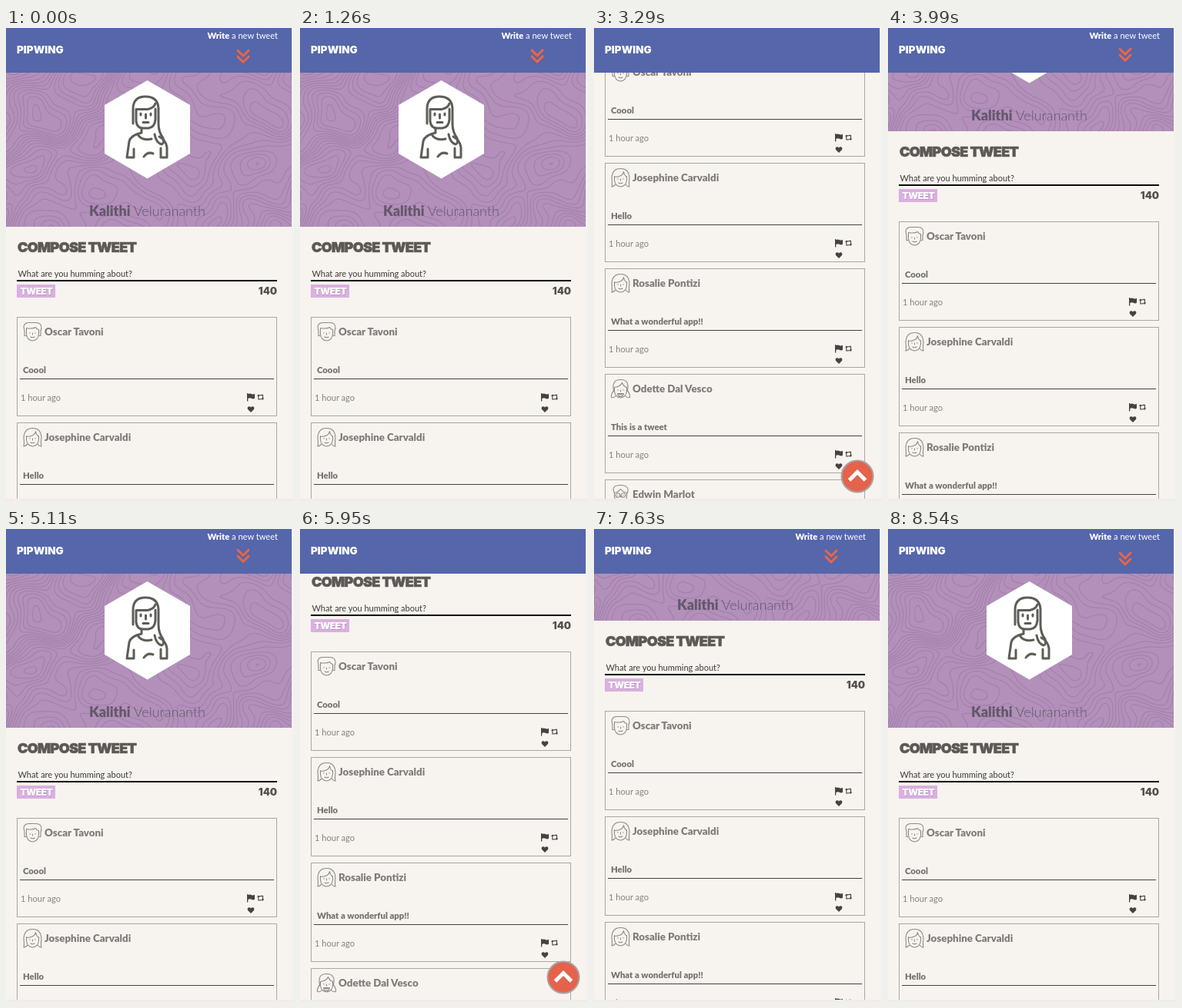
An HTML page with a canvas for the animation above (8610 ms loop, 374 px wide and 614 px high).

```html
<!DOCTYPE html>
<html lang="en">
<head>
<meta charset="utf-8">
<title>Pipwing</title>
<style>
  html, body { margin: 0; width: 100%; height: 100%; overflow: hidden; background: #f7f3ef; }
  #stage { position: relative; width: 374px; height: 614px; overflow: hidden; }
  #page { position: absolute; top: 0; left: 0; will-change: transform; }
  #topo { position: absolute; top: 58px; left: 0; }
  svg { position: absolute; top: 0; left: 0; display: block; }
  text { font-family: Lato, "Open Sans", sans-serif; font-size: 11.1px; }
  .block { font-family: Inter, Roboto, sans-serif; font-weight: 900; }
  .bold { font-weight: 900; }
  .light { font-weight: 300; }
  .line { fill: none; stroke-linecap: round; stroke-linejoin: round; }
  .name { font-size: 13.3px; font-weight: 900; fill: #7f7c7a; }
  .body { font-size: 11.3px; font-weight: 900; fill: #75726f; }
  .time { font-weight: 400; fill: #85817e; }
</style>
</head>
<body>
<div id="stage">
  <div id="page">
    <canvas id="topo" width="371" height="200"></canvas>
    <svg width="374" height="1100">
      <defs>
        <g id="icons" fill="#454240">
          <path d="M313 474h1.300v10.500H313zM314.300 475q2.200-1.200 4.400 0t4.300-.2v6q-2.100 1.200-4.300 0t-4.400.2z"/>
          <path class="line" stroke="#454240" stroke-width="1.100" d="M329.500 482h-1.700v-5.200h4.200M331.500 476.300h2v5.400h-4"/>
          <path d="M326 477.800l1.800-2.300 1.800 2.300zM331.700 480.500l1.800 2.300 1.800-2.300z"/>
          <path d="M318 499l-4-4q-1.200-2.200.6-3.500 2-1 3.400.9 1.400-1.900 3.400-.9 1.800 1.300.6 3.500z"/>
        </g>
        <g id="face">
          <path d="M-8-2V3Q-7 11 0 11.500Q7 11 8 3V-2"/>
          <path d="M-3.500 1v.6M3.500 1v.6M0 1.500v2M-2.500 6.500q2.500 1.500 5 0"/>
        </g>
        <g id="man">
          <use href="#face"/>
          <path d="M-8.500 5h-2v-6l-1-6q1-5 7-5h9q7 0 7 7l-1 4v6h-2M-8-2V-5q8 1.500 12-1 1 2.500 4 3v2"/>
        </g>
        <g id="girl">
          <use href="#face"/>
          <path d="M-8-1Q3-1 4-8Q5-3 8-1M-7 9q-3 3-4.500 2.500 1-4 0-11Q-11-12 0-12Q11-12 11.500 .500q-1 7 0 11-2 .5-4.500-2.500"/>
        </g>
        <g id="pigtails">
          <use href="#face"/>
          <path d="M-8-2Q0-3 2-8Q4-3 8-2M-9 2Q-12-12 0-12Q12-12 9 2M-8.500 2q-4 4-3.500 9 4 1 6-2M8.500 2q4 4 3.500 9-4 1-6-2M-4 6h8q-1 4-4 4t-4-4z"/>
        </g>
        <g id="glasses">
          <use href="#face"/>
          <path d="M-8-2Q-13-12 0-12Q12-12 9-2Q3-3 0-7Q-3-3-8-2"/>
          <circle cx="-3.500" cy="1" r="2.800"/><circle cx="3.500" cy="1" r="2.800"/>
        </g>
      </defs>

      <path fill="#fff" d="M183.500 68L239 100V163L183.500 195.500L128 163V100z"/>
      <g class="line" stroke="#5c5e57" stroke-width="3">
        <path d="M165 124V105Q165 89 181 89Q197 89 198 104V124Q198 135 204 143Q206 150 202 151Q195 149 193 138"/>
        <path d="M169 105.500H184Q192 104 194 98M169 105.500V121Q170 130 178 130H185Q193 129 194 119V105"/>
        <path d="M175 111v2M188 111v2M181.500 112v5M178 122.500h7"/>
        <path d="M176 131v5Q162 139 160 147L157 168H166V157M199 141Q208 146 209 155V168H201V156"/>
        <path d="M171 138Q176 147 189 144M179 167Q184 160 191 163"/>
      </g>
      <text x="183.500" y="244" text-anchor="middle" fill="#63586a" style="font-size:18px"><tspan class="bold">Kalithi</tspan><tspan class="light"> Velurananth</tspan></text>

      <text class="block" x="15" y="290.500" fill="#5d5855" stroke="#5d5855" stroke-width=".6" style="font-size:18px;letter-spacing:-.7px">COMPOSE TWEET</text>
      <text x="15.500" y="323" fill="#3c3a38" style="font-size:11px">What are you humming about?</text>
      <rect x="14" y="327" width="338" height="2" fill="#0b0a0a"/>
      <rect x="14" y="333" width="50" height="17" fill="#dab0e0"/>
      <text class="block" x="19" y="346.500" fill="#b795bf" style="font-size:12px;letter-spacing:-.5px">TWEET</text>
      <text class="block" x="18.500" y="346" fill="#fff" style="font-size:12px;letter-spacing:-.5px">TWEET</text>
      <text class="block" x="352" y="345.500" text-anchor="end" fill="#55514e" style="font-size:13px">140</text>
      <g id="cards"></g>
    </svg>
  </div>

  <svg width="374" height="614">
    <rect width="371" height="58" fill="#5566aa"/>
    <text class="block" x="14" y="33" fill="#fff" style="font-size:13.5px">PIPWING</text>
    <g id="nav">
      <text x="353" y="14" text-anchor="end" fill="#fff"><tspan class="bold">Write</tspan> a new tweet</text>
      <path id="arrow" class="line" stroke="#ea6547" stroke-width="3" d="M301-7l7 7 7-7M301 1l7 7 7-7"/>
    </g>
    <g id="up">
      <circle cx="342" cy="582" r="20.500" fill="#e5624c" stroke="#aaa39f" stroke-width="2"/>
      <path fill="none" stroke="#fff" stroke-width="5" d="M331.500 587l10.500-10.500 10.500 10.500"/>
    </g>
    <rect x="371" width="3" height="614" fill="#f5f1f2"/>
    <rect y="611" width="374" height="3" fill="#efecea"/>
  </svg>
</div>

<script>
const $ = id => document.getElementById(id);
const LOOP = 8610, FOLD = 200;

const tweets = [
  ['Oscar Tavoni', 'Coool', 'man'],
  ['Josephine Carvaldi', 'Hello', 'girl'],
  ['Rosalie Pontizi', 'What a wonderful app!!', 'girl'],
  ['Odette Dal Vesco', 'This is a tweet', 'pigtails'],
  ['Edwin Marlot', 'Hello', 'glasses']
];
$('cards').innerHTML = tweets.map(([name, body, face], i) => `
  <g transform="translate(0 ${i * 137})">
    <rect x="14.5" y="375.5" width="337" height="128" fill="none" stroke="#aaa6a3"/>
    <use href="#${face}" x="34.5" y="394.5" class="line" stroke="#8d8a87" stroke-width="1.1"/>
    <text class="name" x="50" y="399">${name}</text>
    <text class="body" x="22" y="448">${body}</text>
    <rect x="18" y="455" width="330" height="1" fill="#454240"/>
    <text class="time" x="19" y="484">1 hour ago</text>
    <use href="#icons"/>
  </g>`).join('');

// Height field whose level lines form the banner's map pattern
function height(x, y) {
  const u = x + 14 * Math.sin(y / 19 + 1) + 6 * Math.sin(x / 11 + y / 15);
  const v = y + 12 * Math.sin(x / 22) + 5 * Math.sin(y / 9 - x / 17);
  return 2.3 * Math.sin(u / 24) * Math.cos(v / 21) + 1.7 * Math.sin(u / 41 + v / 29 + 2);
}

function drawTopo() {
  const ctx = $('topo').getContext('2d');
  const { width, height: rows } = ctx.canvas;
  const img = ctx.createImageData(width, rows);
  const base = [178, 144, 186], ink = [154, 121, 164];
  for (let y = 0; y < rows; y++) for (let x = 0; x < width; x++) {
    const h = height(x, y);
    const slope = Math.hypot(height(x + 1, y) - h, height(x, y + 1) - h) + 0.004;
    const level = h * 1.6;
    const dist = Math.abs(level - Math.round(level)) / (slope * 1.6);
    const k = Math.max(0, 1 - dist) * 0.75;
    const p = (y * width + x) * 4;
    for (let c = 0; c < 3; c++) img.data[p + c] = base[c] + (ink[c] - base[c]) * k;
    img.data[p + 3] = 255;
  }
  ctx.putImageData(img, 0, 0);
}

const span = (t, from, to) => Math.max(0, Math.min(1, (t - from) / (to - from)));
const flick = p => 1 - (1 - p ** 1.44) ** 3;
const swing = p => 0.5 - Math.cos(p * Math.PI) / 2;

function scrollAt(t) {
  return Math.round(t < 5000
    ? 341 * (flick(span(t, 1545, 2870)) - swing(span(t, 3200, 4544)))
    : 331 * (flick(span(t, 5490, 6560)) - swing(span(t, 6890, 8234))));
}

// The bob restarts each time the link reappears
function bobAt(t) {
  const shown = t < 3300 ? -375 : t < 6900 ? 3798 : 7471;
  return 36.2 + 2.8 * Math.cos((t - shown) / 500 * 2 * Math.PI);
}

function render(now) {
  const t = now % LOOP, y = scrollAt(t), top = y <= FOLD;
  $('page').style.transform = `translateY(${-y}px)`;
  $('nav').style.display = top ? '' : 'none';
  $('up').style.display = top ? 'none' : '';
  $('arrow').setAttribute('transform', `translate(0 ${bobAt(t).toFixed(2)})`);
}

drawTopo();
let start;
function tick(now) {
  start ??= now;
  render(now - start);
  requestAnimationFrame(tick);
}
render(0);
requestAnimationFrame(tick);
</script>
</body>
</html>
```
